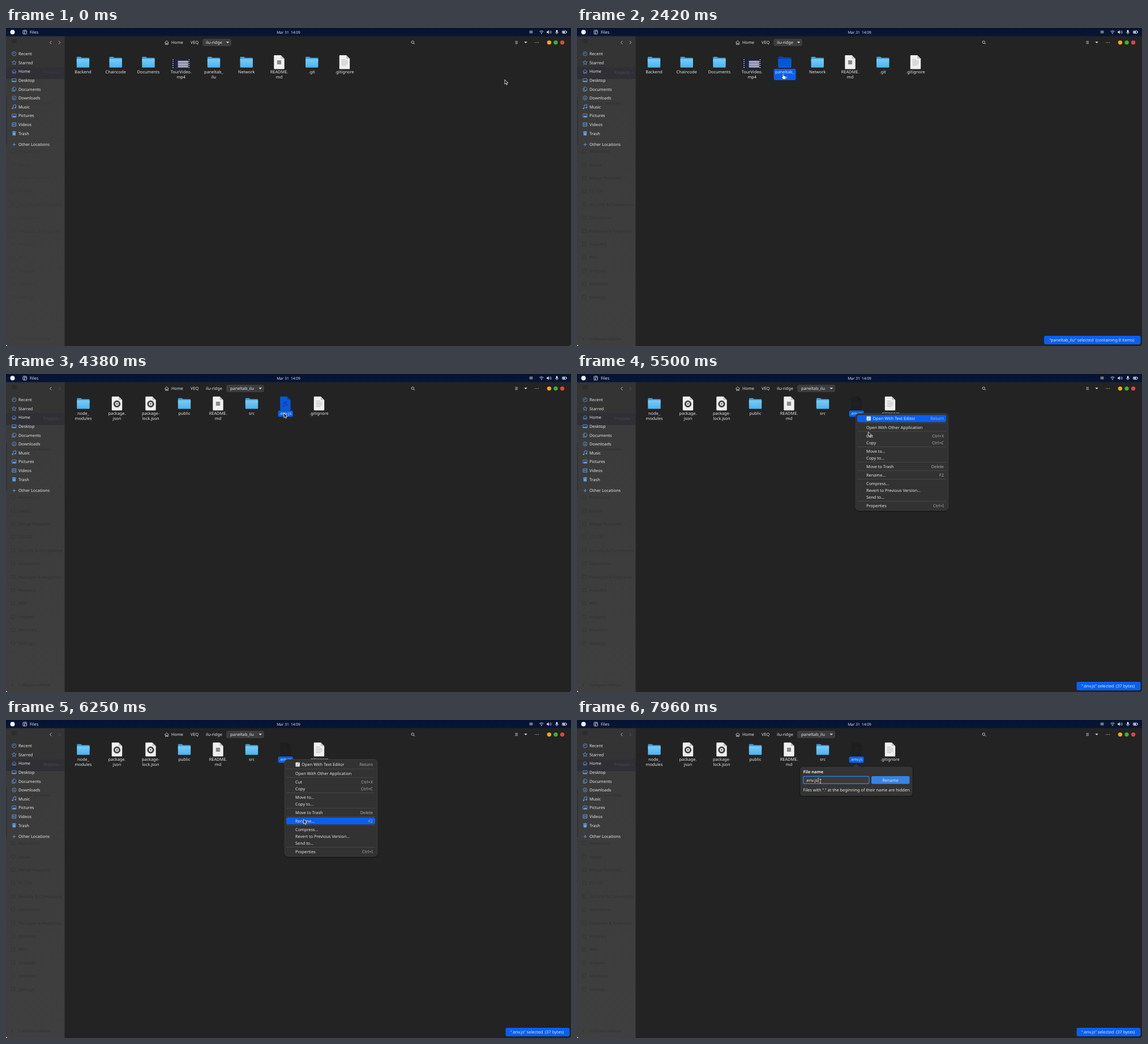
An HTML page that plays this animation: 998 by 561 pixels, repeating every 8 s.

```html
<!DOCTYPE html>
<html lang="en">
<head>
<meta charset="utf-8">
<title>File manager</title>
<style>
html, body { margin: 0; width: 100%; height: 100%; overflow: hidden; background: #232323; }
svg { display: block; width: 100vw; height: 100vh; }
text { font: 7.35px "Noto Sans", "Open Sans", sans-serif; fill: #e6e6e6; white-space: pre; text-rendering: geometricPrecision; }
</style>
</head>
<body>
<svg id="stage" viewBox="0 0 998 561">
  <defs>
    <linearGradient id="folder" x2="0" y2="1"><stop stop-color="#78cdf8"/><stop offset="1" stop-color="#4eb2ea"/></linearGradient>
    <linearGradient id="bar" x2="0" y2="1"><stop stop-color="#06122f"/><stop offset="1" stop-color="#081637"/></linearGradient>
    <linearGradient id="side" x2="0" y2="1"><stop stop-color="#3a3a3a"/><stop offset="1" stop-color="#3f3f3f"/></linearGradient>
  </defs>
</svg>
<script>
const LOOP = 8000;
const BLUE = '#0860f2', LIGHT = '#e6e6e6', SOFT = '#cfcfcf', ACCENT = '#62a0ea';
const PROJECT = 'ilu-ridge', FOLDER = 'paneltab_ilu', PARENT = 'VEQ';
const stage = document.getElementById('stage');

const rect = (x, y, w, h, fill, r = 0, more = '') =>
  `<rect x="${x}" y="${y}" width="${w}" height="${h}" rx="${r}" fill="${fill}" ${more}/>`;
const circle = (x, y, r, fill, more = '') => `<circle cx="${x}" cy="${y}" r="${r}" fill="${fill}" ${more}/>`;
const line = (d, color = LIGHT, w = 1, more = '') =>
  `<path d="${d}" fill="none" stroke="${color}" stroke-width="${w}" ${more}/>`;
const shape = (d, fill = LIGHT, more = '') => `<path d="${d}" fill="${fill}" ${more}/>`;
const text = (x, y, s, more = '') => `<text x="${x}" y="${y}" ${more}>${s}</text>`;
const mid = (x, y, s, more = '') => text(x, y, s, `text-anchor="middle" ${more}`);
const at = (x, y, s) => `<g transform="translate(${x} ${y})">${s}</g>`;
const triangle = (x, y) => shape(`M${x - 2.8} ${y - 1.4}h5.6l-2.8 3z`, SOFT);

function layer(html) {
  const g = document.createElementNS('http://www.w3.org/2000/svg', 'g');
  g.innerHTML = html;
  stage.append(g);
  return g;
}
const show = (el, on) => el.setAttribute('visibility', on ? 'visible' : 'hidden');

// Icons are drawn around the origin
function folder(selected) {
  const [back, front] = selected ? ['#0040b8', '#0656dc'] : ['#3f9fd8', 'url(#folder)'];
  return shape('M-11.2 -8q0 -1.4 1.4 -1.4h5.6l1.8 1.6h12.2q1.4 0 1.4 1.4v5h-22.4z', back) +
    rect(-11.2, -5.8, 22.4, 15.4, front, 1.4);
}
const paper = (fill, fold) =>
  shape('M-9.2 -11q0 -1.2 1.2 -1.2h11l6.2 6.2v17q0 1.2 -1.2 1.2h-16q-1.2 0 -1.2 -1.2z', fill) +
  shape('M3 -12.2l6.2 6.2h-5q-1.2 0 -1.2 -1.2z', fold);
const page = paper('#f0f0f0', '#c4c4c4');
const script = (fill, fold, ink) => paper(fill, fold) +
  mid(0, 4, 'JS', `style="font-size:10px;font-weight:500;fill:${ink}"`);
const note = page + rect(-3.6, -3.2, 7.2, 7.2, '#8a8a8a');
const gear = page + circle(0, .8, 4.5, 'none', 'stroke="#3a3a3a" stroke-width="2.6"') +
  circle(0, .8, 6, 'none', 'stroke="#3a3a3a" stroke-width="1" stroke-dasharray="1 1"') + circle(0, .8, 1.3, '#3a3a3a');
const plain = page + line('M-5.5 -4.5h7M-5.5 -2h11M-5.5 .5h11M-5.5 3h11M-5.5 5.5h8', '#b8b8b8', 1.1);

function clip() {
  let s = rect(-16, -6.2, 32, 18, '#0c1020') + rect(-12.4, -6.2, 24.8, 18, '#1b2342') + rect(-6, -2.6, 19, 12.6, '#3b3f5c');
  for (let i = 0; i < 5; i++) {
    s += rect(-5.5, -2 + i * 2.4, 18, 1.4, i % 2 ? '#d9c9e0' : '#eceef6');
    s += rect(-15.2, -5.2 + i * 3.5, 2, 1.8, '#a9afc0') + rect(13.2, -5.2 + i * 3.5, 2, 1.8, '#a9afc0');
  }
  return s;
}

function files(items, x0, step, y) {
  return items.map(([icon, a, b], i) => {
    const x = x0 + i * step;
    return at(x, y, icon) + mid(x, y + 20.1, a) + (b ? mid(x, y + 28.8, b) : '');
  }).join('');
}

function topBar() {
  return rect(0, 0, 998, 14.5, 'url(#bar)') + circle(11.5, 7.2, 4, '#f2f2f2') +
    rect(30, 4, 6.4, 6.6, 'none', 1, 'stroke="#ddd" stroke-width=".9"') + line('M33.5 4v3h-1v3.6M31.8 6v1M35 6v1', '#ddd', .8) +
    text(42, 9.9, 'Files') + mid(499, 9.6, 'Mar 31  14:09', 'style="font-size:6.55px"') +
    rect(924.5, 4.5, 6, 5, '#777', 1) +
    line('M942.3 6.2q3.6 -3 7.2 0M943.7 7.8q2.2 -1.8 4.4 0', SOFT, .9) + circle(945.9, 9.6, .9, SOFT) +
    shape('M955 6h1.6l2.4 -2v6.6l-2.4 -2H955z', SOFT) + line('M960.3 5.5q1.4 1.7 0 3.5M962 4.3q2.4 3 0 6', SOFT, .8) +
    rect(971.6, 3.5, 2.8, 4.8, LIGHT, 1.4) + line('M970.4 7q0 2.5 2.6 2.5t2.6 -2.5M973 9.5v1.5', SOFT, .8) +
    rect(982.5, 5, 7, 4.6, 'none', 1, 'stroke="#ddd" stroke-width=".9"') + rect(983.5, 6, 4, 2.6, LIGHT) + rect(990, 6.3, .8, 2, LIGHT);
}

function header() {
  const lights = ['#f9a913', '#38b42d', '#e0453f'];
  return line('M80.3 22.8l-2.8 2.8l2.8 2.8', SOFT, .9) +
    line('M280.3 26l3.6 -3.6l3.6 3.6M281.6 25.5v3.6h1.6v-2h1.5v2h1.6v-3.6', SOFT, .9) +
    text(292, 28.2, 'Home') + text(326, 28.2, PARENT) +
    circle(718.3, 25, 2.2, 'none', 'stroke="#cfcfcf" stroke-width=".9"') + line('M720 26.7l2 2', SOFT, 1) +
    line('M899.4 23.5h4.6M899.4 25.5h4.6M899.4 27.5h4.6', SOFT, .8) + triangle(918, 25.5) +
    [934.8, 937.6, 940.4].map(x => circle(x, 25.6, .7, SOFT)).join('') +
    lights.map((c, i) => circle(959.4 + i * 11.6, 25.6, 3.7, c)).join('');
}

function sidebar() {
  const box = (x, y, w, h) => rect(x, y, w, h, 'none', .6, `stroke="${ACCENT}" stroke-width=".8"`);
  const ring = circle(0, 0, 3.6, 'none', `stroke="${ACCENT}" stroke-width=".8"`);
  const glyphs = {
    Recent: ring + line('M0 -2v2h-2', ACCENT, .8),
    Starred: line('M0 -3.8l1.1 2.6 2.8 .2 -2.1 1.8 .7 2.7 -2.5 -1.5 -2.5 1.5 .7 -2.7 -2.1 -1.8 2.8 -.2z', ACCENT, .8),
    Home: line('M-4 .4l4 -3.8l4 3.8M-2.6 -.4v3.7h1.8v-2h1.6v2h1.8v-3.7', ACCENT, .8),
    Desktop: box(-3.7, -2.8, 7.4, 5.6) + rect(-3.4, 1, 6.8, 1.6, ACCENT),
    Documents: line('M-1.5 -3.5h3l1.8 1.8v4h-4.8zM-1.7 -1.7h-1.7v5.3h4.8v-1.2', ACCENT, .8),
    Downloads: ring + line('M0 -2v3.6M-1.5 .3l1.5 1.5l1.5 -1.5', ACCENT, .8),
    Music: line('M-1.5 2.6v-5.3l4.8 -1v5', ACCENT, .9) + circle(-2.6, 2.7, 1.3, ACCENT) + circle(2.2, 1.5, 1.3, ACCENT),
    Pictures: box(-3.7, -3, 7.4, 6) + shape('M-3 2.4l2 -3l1.5 1.5l1.2 -1.6l1.8 3.1z', ACCENT),
    Videos: box(-3.7, -3.2, 7.4, 6.4) + line('M-1.9 -3v6M1.9 -3v6M-1.9 0h3.8', ACCENT, .8),
    Trash: rect(-3.6, -3.2, 7.2, 1.3, ACCENT) + rect(-1.2, -4, 2.4, 1, ACCENT) + shape('M-3 -1.4h6l-.3 5.2h-5.4z', ACCENT),
    'Other Locations': line('M0 -2.8v5.6M-2.8 0h5.6', ACCENT, .9)
  };
  return Object.entries(glyphs).map(([name, glyph], i) => {
    const y = i < 10 ? 45.4 + i * 15.6 : 205.6;
    return at(14.3, y, glyph) + text(22, y + 2.7, name);
  }).join('');
}

function ghost() {
  const rows = ['Repository', 'Issues', 'Merge Requests', 'CI / CD', 'Security &amp; Compliance', 'Operations',
    'Packages &amp; Registries', 'Analytics', 'Wiki', 'Snippets', 'Members', 'Settings'];
  const ink = 'style="fill:#2b2b2b"';
  return rows.map((s, i) => {
    const y = 217.5 + i * 23.4;
    return rect(9.5, y - 3, 6, 6, 'none', 1, 'stroke="#2b2b2b" stroke-width=".8"') + text(22, y + 2.7, s, ink);
  }).join('') + text(22, 134.6, 'Project overview', ink) +
    text(22, 551.2, 'Collapse sidebar', ink) + line('M13 546l-3 2.8l3 2.8', '#2b2b2b') +
    text(66, 81.2, 'Projects', 'style="fill:#57525f"') + line('M96 77.8l1.7 1.7l1.7 -1.7', '#57525f', .8);
}

// Fixed parts
layer(rect(0, 0, 998, 561, '#232323') + rect(0, 14, 104, 547, 'url(#side)') + rect(0, 14, 104, 55, '#343434') +
  rect(0, 69, 104, 21, '#312f36') + rect(0, 121, 1.4, 85, '#2e2e36') +
  rect(10, 19, 9, 8, '#2d2d2d', 1) + rect(103.4, 14, .8, 547, '#2a2a2a'));
const ghosts = layer(ghost());
layer(sidebar() + topBar() + header() + shape('M0 557q0 4 4 4H0z', '#eee') + shape('M998 558q0 3 -3 3h3z', '#777'));

// First folder
const viewA = layer(rect(347, 19, 51, 13, '#3c3c3c', 3.5) + text(353, 28.2, PROJECT) + triangle(391.6, 25.5) +
  line('M93 22.8l2.8 2.8l-2.8 2.8', SOFT, .9) +
  files([[folder(), 'Backend'], [folder(), 'Chaincode'], [folder(), 'Documents'], [clip(), 'TourVideo.', 'mp4'],
    [folder(), 'paneltab_', 'ilu'], [folder(), 'Network'], [note, 'README.', 'md'], [folder(), '.git'],
    [plain, '.gitignore']], 136, 57.75, 60.2));
const pickA = layer(at(367, 60.2, folder(true)) + rect(347.6, 72, 39, 20, BLUE, 3) +
  mid(367, 80.3, 'paneltab_') + mid(367, 89, 'ilu'));

// Second folder
const viewB = layer(rect(389, 19, 67, 13, '#3c3c3c', 3.5) + text(353, 28.2, PROJECT) + text(396, 28.2, FOLDER) +
  triangle(449.2, 25.5) + line('M93 22.8l2.8 2.8l-2.8 2.8', '#5f5f5f', .9) +
  files([[folder(), 'node_', 'modules'], [gear, 'package.', 'json'], [gear, 'package-', 'lock.json'], [folder(), 'public'],
    [note, 'README.', 'md'], [folder(), 'src'], ['', ''], [plain, '.gitignore']], 136.5, 59.5, 52));
const envIcons = [
  script('#f0f0f0', '#c4c4c4', '#e0b020'),
  script('#0a58dc', '#0546ba', '#08347c'),
  script('#1e1e1e', '#1a1a1a', '#2b2722')
].map(s => layer(at(493.5, 52, s)));
const envLabel = layer(mid(493.5, 72.2, '.env.js'));
const envPick = layer(rect(480.6, 64.6, 26.2, 10.8, BLUE, 2.5) + mid(493.5, 72.2, '.env.js'));

const status = (x, s) => layer(rect(x, 543, 995.5 - x, 15, BLUE, 3) + mid((x + 995.5) / 2 - .8, 553.2, s));
const statusA = status(825, `“${FOLDER}” selected  (containing 8 items)`);
const statusB = status(882.5, '“.env.js” selected  (37 bytes)');

// Context menu
const ROWS = [[78.6, 'Open With Text Editor', 'Return'], [94, 'Open With Other Application'], [109, 'Cut', 'Ctrl+X'],
  [121, 'Copy', 'Ctrl+C'], [136, 'Move to…'], [148, 'Copy to…'], [163, 'Move to Trash', 'Delete'],
  [178, 'Rename…', 'F2'], [193, 'Compress…'], [205, 'Revert to Previous Version…'], [217, 'Send to…'],
  [232, 'Properties', 'Ctrl+I']];
const menu = layer(rect(491, 69, 166, 174, '#000', 7, 'opacity=".25"') +
  rect(492, 69.5, 164, 171, '#323232', 6, 'stroke="#474747" stroke-width=".7"') +
  [86.3, 101.3, 128.5, 155.5, 170.5, 185.5, 224.5].map(y => line(`M495 ${y}h157`, '#4b4b4b', .8)).join('') +
  rect(495, 72.5, 157, 12.2, BLUE, 3, 'id="hover"') +
  rect(511.5, 74.8, 7.5, 7.5, '#e4e4e4', 1) + line('M513.5 81l3.5 -5', '#888', .9) +
  ROWS.map(([y, s, key], i) => text(i ? 511 : 522.3, y + 2.6, s) +
    (key ? text(648, y + 2.6, key, 'text-anchor="end" style="fill:#adadad"') : '')).join(''));
const hover = document.getElementById('hover');

// Rename popover
const popover = layer(rect(392.5, 81, 202, 55, '#000', 6, 'opacity=".22"') +
  shape('M399 82h88l6 -5l6 5h89q5 0 5 5v42q0 5 -5 5h-189q-5 0 -5 -5v-42q0 -5 5 -5z', '#343434', 'stroke="#1b1b1b" stroke-width=".6"') +
  text(399.5, 94, 'File name', 'style="font-weight:600"') +
  rect(399.6, 99.4, 116.4, 13, '#3a3a3a', 2.5, 'stroke="#3584e4" stroke-width="1.2"') +
  rect(520, 99, 67.5, 13.8, '#3584e4', 2.5) + mid(553.5, 108.5, 'Rename') +
  text(399.5, 125.6, 'Files with “.” at the beginning of their name are hidden.') +
  rect(403.4, 101.5, 16, 9, '#1b62c4', 0, 'id="chosen"') + text(403.6, 108.5, '.env.js') +
  rect(425.7, 101.5, .8, 9, LIGHT, 0, 'id="caret"'));
const chosen = document.getElementById('chosen'), caret = document.getElementById('caret');

// Pointers
const arrow = layer(shape('M0 0v8.2l1.9 -1.7l1.3 2.9l1.4 -.6l-1.3 -2.8h2.6z', '#222', 'stroke="#f2f2f2" stroke-width=".8"'));
const hand = layer(shape('M-1 0q1 -1 1.8 .3v3l3.2 .8q1.4 .5 1 2.2l-.8 3.2h-4.2l-2.6 -3.6q.2 -1.2 1.6 -.4z', '#f4f4f4', 'stroke="#222" stroke-width=".6"'));
const beam = layer(line('M-1.8 -3.6h3.6M0 -3.6v7.4M-1.8 3.8h3.6', '#111', 1.8) + line('M-1.8 -3.6h3.6M0 -3.6v7.4M-1.8 3.8h3.6', '#f2f2f2', .9));

const PATH = [[0, 881, 91], [100, 881, 91], [1200, 379, 88], [1500, 379, 88], [2100, 364, 81], [2700, 364, 81],
  [4200, 491, 69], [5200, 491, 69], [5500, 514.5, 102], [6050, 525.5, 175], [6500, 525.5, 175], [7400, 430, 108], [LOOP, 430, 108]];

function pointer(t) {
  const i = Math.max(1, PATH.findIndex(p => p[0] > t));
  const [t0, x0, y0] = PATH[i - 1], [t1, x1, y1] = PATH[i];
  const u = (t - t0) / (t1 - t0), e = u * u * (3 - 2 * u);
  return [x0 + (x1 - x0) * e, y0 + (y1 - y0) * e];
}

function hoverRow(t) {
  if (t < 5520) return 0;
  const y = pointer(t - 20)[1] + 2;
  return ROWS.reduce((best, row, i) => Math.abs(row[0] - y) < Math.abs(ROWS[best][0] - y) ? i : best, 0);
}

function draw(t) {
  const opened = t >= 2480, picked = t >= 4320, menuOn = t >= 5150 && t < 6420, renaming = t >= 6520;
  ghosts.setAttribute('opacity', .3 + .4 * Math.min(1, t / 800));
  show(viewA, !opened);
  show(pickA, !opened && t >= 2160);
  show(statusA, !opened && t >= 2360);
  show(viewB, opened);
  const state = !picked ? 0 : menuOn || renaming ? 2 : 1;
  envIcons.forEach((icon, i) => show(icon, opened && i === state));
  show(envLabel, opened && !picked);
  show(envPick, picked);
  show(statusB, t >= 4540);
  menu.setAttribute('display', menuOn ? 'inline' : 'none');
  hover.setAttribute('y', ROWS[hoverRow(t)][0] - 6.1);
  popover.setAttribute('display', renaming ? 'inline' : 'none');
  show(chosen, t < 7480);
  show(caret, t >= 7480);

  const [x, y] = pointer(t);
  const overEntry = renaming && x < 516 && y < 113;
  const grabbing = t >= 2120 && t < 2560;
  [[arrow, !overEntry && !grabbing], [hand, grabbing], [beam, overEntry]].forEach(([el, on]) => {
    show(el, on);
    el.setAttribute('transform', `translate(${x} ${y})`);
  });
}

const start = performance.now();
function tick(now) {
  draw(Math.max(0, now - start) % LOOP);
  requestAnimationFrame(tick);
}
draw(0);
requestAnimationFrame(tick);
</script>
</body>
</html>
```
